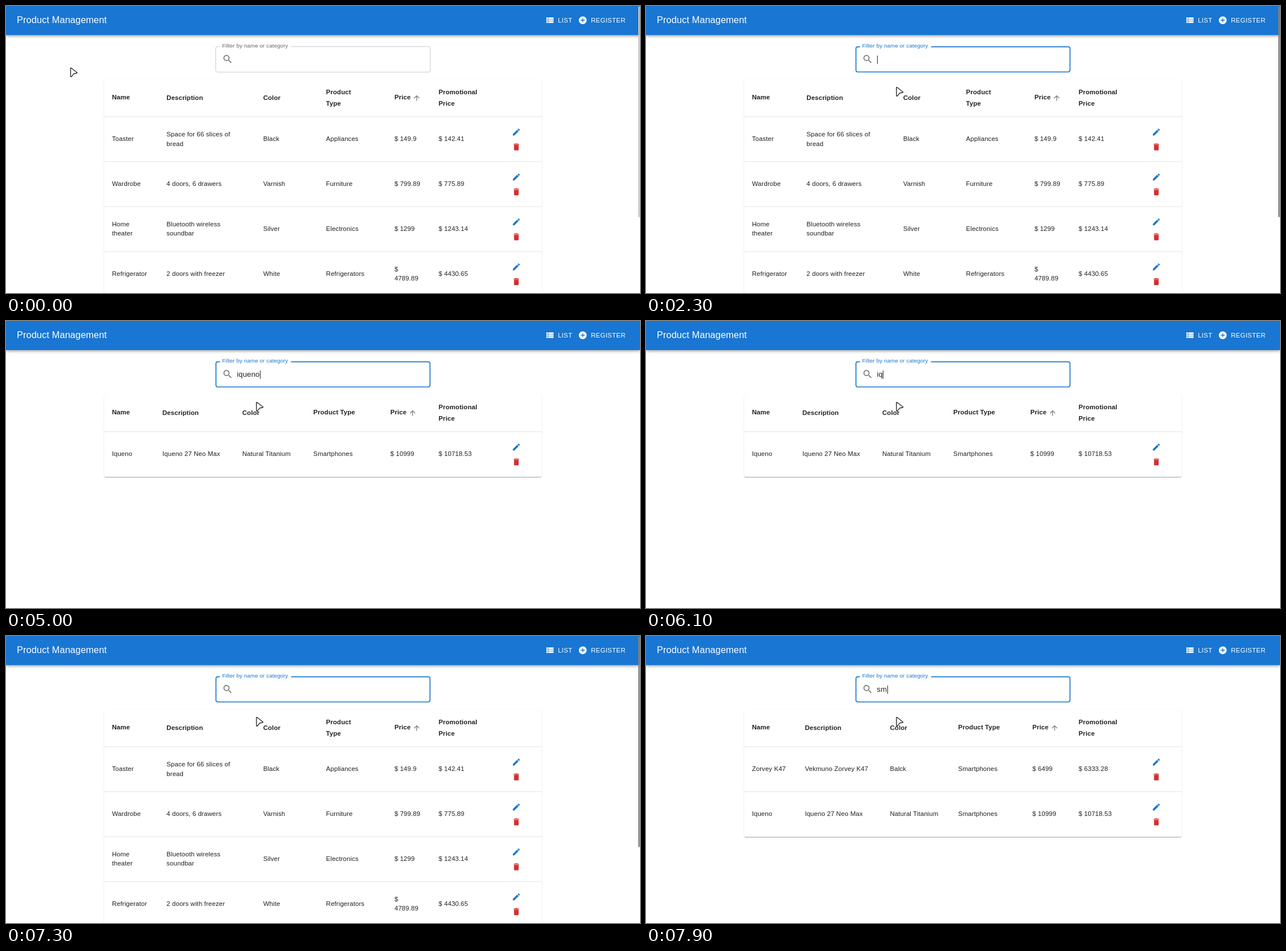
Recreate the animation shown at these times as an HTML page. Size 1111 by 504 pixels, loop 8000 ms.

```html
<!DOCTYPE html>
<html lang="en">
<head>
<meta charset="utf-8">
<title>Product Management</title>
<style>
  html, body { margin: 0; width: 100%; height: 100%; overflow: hidden; background: #fff; }
  div, svg { position: absolute; left: 0; top: 0; }
  #bar { width: 1111px; height: 51px; background: #1976d2;
    box-shadow: 0 1.6px 3.2px -.8px #0003, 0 3.2px 4px #00000024, 0 .8px 8px #0000001f; }
  #paper { left: 172.2px; top: 129px; width: 766.5px; border-radius: 3.2px; background: #fff;
    box-shadow: 0 1.6px .8px -.8px #0003, 0 .8px .8px #00000024, 0 .8px 2.4px #0000001f; }
  text { font: 11.39px "Liberation Sans", Arial, sans-serif; letter-spacing: .0107em; fill: #212121; }
  .head { font-weight: bold; }
  .title { font-size: 16.27px; letter-spacing: .0075em; fill: #fff; }
  .nav { letter-spacing: .0286em; fill: #fff; }
  .label { font-size: 9.76px; letter-spacing: .0094em; }
  .query { font-size: 13.01px; letter-spacing: .0094em; }
</style>
</head>
<body>
<div id="paper"></div>
<div id="bar"></div>
<svg id="stage" width="1111" height="504"></svg>
<script>
const LOOP = 8000, ROW = 78.9, HEAD_END = 194.9;
const BLUE = '#1976d2', GREY = '#757575';

const icons = {
  list: 'M3 14h4v-4H3v4zm0 5h4v-4H3v4zM3 9h4V5H3v4zm5 5h13v-4H8v4zm0 5h13v-4H8v4zM8 5v4h13V5H8z',
  add: 'M12 2C6.48 2 2 6.48 2 12s4.48 10 10 10 10-4.48 10-10S17.52 2 12 2zm5 11h-4v4h-2v-4H7v-2h4V7h2v4h4v2z',
  search: 'M15.5 14h-.8l-.3-.3A6.5 6.5 0 1 0 13.7 14.4l.3.3v.8l5 5L20.5 19zm-6 0a4.5 4.5 0 1 1 0-9 4.5 4.5 0 0 1 0 9z',
  up: 'M4 12l1.4 1.4L11 7.8V20h2V7.8l5.6 5.6L20 12l-8-8z',
  edit: 'M3 17.25V21h3.75L17.8 9.94l-3.75-3.75zM20.7 7.04a1 1 0 0 0 0-1.41l-2.34-2.34a1 1 0 0 0-1.41 0l-1.83 1.83 3.75 3.75z',
  trash: 'M6 19c0 1.1.9 2 2 2h8c1.1 0 2-.9 2-2V7H6zM19 4h-3.5l-1-1h-5l-1 1H5v2h14z'
};

// A bar in a cell marks a line break
const headings = ['Name', 'Description', 'Color', 'Product|Type', 'Price', 'Promotional|Price'];
const products = [
  ['Toaster', 'Space for 66 slices of|bread', 'Black', 'Appliances', '$ 149.9', '$ 142.41'],
  ['Wardrobe', '4 doors, 6 drawers', 'Varnish', 'Furniture', '$ 799.89', '$ 775.89'],
  ['Home|theater', 'Bluetooth wireless|soundbar', 'Silver', 'Electronics', '$ 1299', '$ 1243.14'],
  ['Refrigerator', '2 doors with freezer', 'White', 'Refrigerators', '$|4789.89', '$ 4430.65'],
  ['Zorvey K47', 'Vekmuno Zorvey K47', 'Balck', 'Smartphones', '$ 6499', '$ 6333.28'],
  ['Iqueno', 'Iqueno 27 Neo Max', 'Natural Titanium', 'Smartphones', '$ 10999', '$ 10718.53']
];
const columns = {
  1: [185.7, 274, 414, 538.5, 673.5, 758],
  2: [185.7, 278.4, 427.5, 547, 677, 758],
  all: [185.7, 281.3, 450.7, 560.8, 680.7, 758]
};

const queries = [[0, ''], [3000, 'iq'], [3100, 'iqu'], [3200, 'ique'], [3500, 'iquen'], [3600, 'iqueno'],
  [5500, 'iquen'], [5600, 'ique'], [5800, 'iqu'], [6100, 'iq'], [6200, 'i'], [6300, ''], [7500, 's'], [7900, 'sm']];
const carets = [[0, false], [1400, true], [3900, false], [5000, true], [7300, false], [7500, true]];
const pointers = [[0, 'arrow', 112.3, 108], [100, 'arrow', 244.5, 105.6], [300, 'beam', 436, 96], [500, 'beam', 436.5, 96],
  [600, 'beam', 437, 96.5], [1800, 'arrow', 441.5, 132], [1900, 'arrow', 436, 141], [2200, 'arrow', 437, 141.5], [2300, 'arrow', 438, 142]];

const stage = document.getElementById('stage');
const paper = document.getElementById('paper');

const latest = (track, t) => track.filter(key => key[0] <= t).pop().slice(1);
const text = (s, x, y, cls, fill) => `<text x="${x}" y="${y}" class="${cls}" ${fill ? `style="fill:${fill}"` : ''}>${s}</text>`;
const rect = (x, y, w, h, fill, more = '') => `<rect x="${x}" y="${y}" width="${w}" height="${h}" fill="${fill}" ${more}/>`;
const icon = (name, cx, cy, size, fill) =>
  `<path transform="translate(${cx} ${cy}) scale(${size / 24}) translate(-12 -12)" d="${icons[name]}" fill="${fill}"/>`;

function cell(s, x, cy, gap, cls = '') {
  const lines = s.split('|');
  return lines.map((line, i) => text(line, x, cy + 3.5 + (i - (lines.length - 1) / 2) * gap, cls)).join('');
}

function table(rows) {
  const xs = columns[rows.length] || columns.all;
  let out = headings.map((h, i) => {
    const label = i === 3 && rows.length < 3 ? h.replace('|', ' ') : h;
    const raised = label.includes('|') || i === 1 || i === 2 ? 0 : .7;
    return cell(label, xs[i], 161.5 - raised, 19.5, 'head');
  }).join('');
  out += icon('up', xs[4] + 39, 161.6, 14.64, GREY) + rect(172.2, HEAD_END - .9, 766.5, .9, '#e0e0e0');
  rows.forEach((row, n) => {
    const top = HEAD_END + n * ROW;
    out += row.map((s, i) => cell(s, xs[i], top + 38.8, 16.7)).join('')
      + icon('edit', 894.3, top + 26.5, 16.27, BLUE)
      + icon('trash', 894.3, top + 52.6, 16.27, '#d32f2f')
      + rect(172.2, top + ROW - .9, 766.5, .9, '#e0e0e0');
  });
  return out;
}

function field(t, query) {
  const focused = t >= 1400;
  const line = focused ? 1.63 : .9;
  const stroke = focused ? BLUE : t >= 300 ? '#212121' : '#c4c4c4';
  const blend = Math.min(1, Math.max(0, (t - 1310) / 220));
  const tint = [25, 118, 210].map(c => Math.round(102 + (c - 102) * blend));
  return rect(367.1 + line / 2, 70.8 + line / 2, 376.7 - line, 45.8 - line, 'none',
      `rx="3.2" stroke="${stroke}" stroke-width="${line}"`)
    + rect(375, 69, 124.5, 5, '#fff')
    + text('Filter by name or category', 378.7, 72.6, 'label', `rgb(${tint})`)
    + icon('search', 388.4, 93.4, 19.5, GREY)
    + text(query, 404.6, 97.6, 'query');
}

function pointer(kind, x, y) {
  const at = `transform="translate(${x} ${y})"`;
  if (kind === 'arrow') {
    return `<path ${at} d="M.8 1.8Q.8 .2 2 1.1L12 8.6Q13 9.8 11.4 10L6.6 10.8 2.7 15.8Q1.2 17.2 1 15.4Z" fill="#fff" stroke="#1a1a1a" stroke-width="1.3"/>`;
  }
  const d = 'M-3 -6.3H-1.5Q0 -6.3 0 -4.5Q0 -6.3 1.5 -6.3H3M0 -4.5V4.5M-3 6.3H-1.5Q0 6.3 0 4.5Q0 6.3 1.5 6.3H3';
  return `<g ${at} fill="none"><path d="${d}" stroke="#1a1a1a" stroke-width="3"/><path d="${d}" stroke="#fff" stroke-width="1"/></g>`;
}

function draw(t) {
  const [query] = latest(queries, t);
  const rows = products.filter(p => [p[0], p[3]].some(s => s.toLowerCase().includes(query)));
  const height = HEAD_END - 129 + rows.length * ROW;
  paper.style.height = height + 'px';

  let out = text('Product Management', 19, 29.5, 'title')
    + icon('list', 953.2, 24.9, 16.8, '#fff') + text('LIST', 967.2, 28.6, 'nav')
    + icon('add', 1010.7, 25, 16.4, '#fff') + text('REGISTER', 1025, 28.6, 'nav')
    + field(t, query) + table(rows);
  const page = 129 + height + 17;
  if (page > 504) out += rect(1108, 1, 2.6, 504 * 504 / page - 1, t < 1400 ? '#c6c6c6' : '#808080', 'rx="1"');
  stage.innerHTML = out + pointer(...latest(pointers, t));

  if (latest(carets, t)[0]) {
    const width = query ? stage.querySelector('.query').getComputedTextLength() : 0;
    stage.insertAdjacentHTML('beforeend', rect(Math.round(405 + width), 87, 1, 14.5, '#212121'));
  }
}

let shown = -1;
function tick() {
  const t = Math.floor(performance.now() % LOOP / 100) * 100;
  if (t !== shown) draw(shown = t);
  requestAnimationFrame(tick);
}
tick();
</script>
</body>
</html>
```
